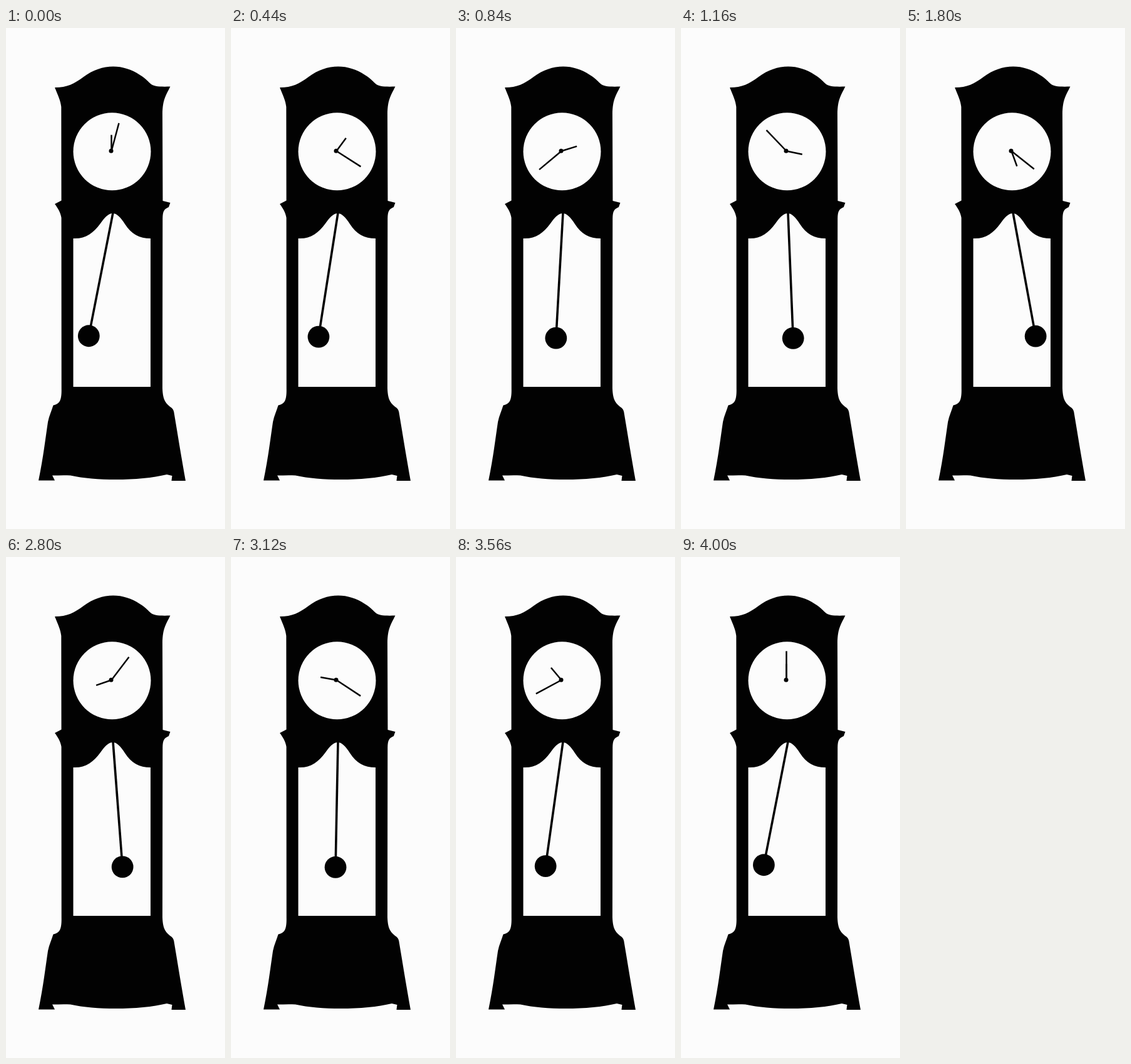
Animation, 350 px wide and 800 px high, one loop 4.04 s. Source, as an HTML page with a canvas:

```html
<!DOCTYPE html>
<html lang="en">
<head>
<meta charset="utf-8">
<title>Pendulum clock</title>
<style>
  html, body { margin: 0; width: 100%; height: 100%; overflow: hidden; background: #fcfcfc; }
  canvas { display: block; width: 350px; height: 800px; }
</style>
</head>
<body>
<canvas id="stage" width="350" height="800"></canvas>
<script>
const ctx = document.getElementById('stage').getContext('2d');
const INK = '#020202', PAPER = '#fcfcfc';
const LOOP = 4040, STEP = 40, LAST = 99, SWING = 50;

const body = new Path2D(`
  M78 95 C98 95 109 89 124 78 C152 57 186 56 214 75
  C222 80 226 84 231 89 C236 93.5 246 94 262.5 93.5
  C255 109 250.5 114 250 137 L250.5 276 L262.5 279 L260 286
  C253 289 250.5 292 250.3 304 L250 575 C250.5 592 254 599 264 606
  C268 609 268.5 613 269 617 C275 653 281 690 287 723
  L264.5 723 L265.5 715 L257 713 C216 723 146 724 103 714.5
  C94 713.8 84 714.3 74 714.5 L78 722.5 L52 722.5
  C60 684 63 655 67 629 C69 619 73 611 75.5 602.5
  C86 600 89 595 88.7 576 L88.5 303 C87 294 83 288 78 281
  L88.5 275.5 L88.3 126 C87 115 83 108 78 95 Z`);

const door = new Path2D(`
  M107.5 573 V336 C127 337 139 328 151 312
  C158 302 164 296 170.5 296 C177 296 183 302 190 313
  C200 329 213 336 231 336 V573 Z`);

const rad = deg => deg * Math.PI / 180;

function disc(x, y, r, color) {
  ctx.fillStyle = color;
  ctx.beginPath();
  ctx.arc(x, y, r, 0, 2 * Math.PI);
  ctx.fill();
}

// Angle runs clockwise from straight up.
function rod(x, y, length, deg, width) {
  const endX = x + length * Math.sin(rad(deg));
  const endY = y - length * Math.cos(rad(deg));
  ctx.strokeStyle = INK;
  ctx.lineWidth = width;
  ctx.beginPath();
  ctx.moveTo(x, y);
  ctx.lineTo(endX, endY);
  ctx.stroke();
  return [endX, endY];
}

function draw(step) {
  ctx.fillStyle = PAPER;
  ctx.fillRect(0, 0, 350, 800);
  ctx.fillStyle = INK;
  ctx.fill(body);
  ctx.fillStyle = PAPER;
  ctx.fill(door);
  disc(169.5, 197.3, 62, PAPER);

  const turn = step / LAST;
  rod(168.5, 196.5, 25.8, 360 * turn, 2.5);
  rod(168.5, 196.5, 46.2, 15 + 1065 * turn, 2.5);
  disc(168, 196.2, 3.5, INK);

  const phase = Math.PI * step / SWING;
  const lean = -11.13 * Math.cos(phase) + 0.27 * Math.sin(phase) ** 2;
  const [bobX, bobY] = rod(171, 295, 200.5, 180 - lean, 3.6);
  disc(bobX, bobY, 17.4, INK);
}

const start = performance.now();
function tick() {
  const time = (performance.now() - start) % LOOP;
  // The first pose is held for two steps.
  draw(Math.max(0, Math.floor(time / STEP) - 1));
  requestAnimationFrame(tick);
}
tick();
</script>
</body>
</html>
```
